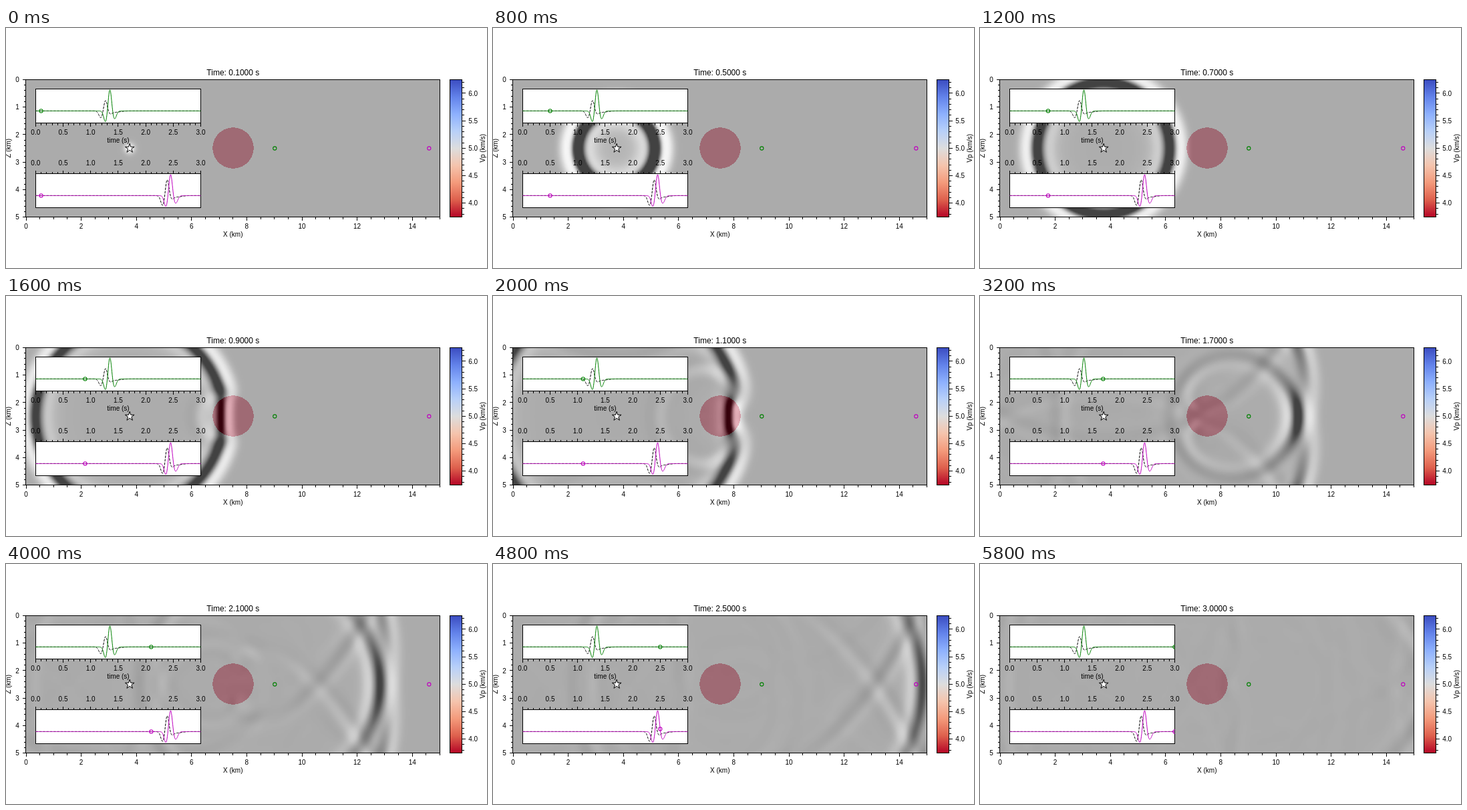
These frames come from a looping animation (720 by 360 pixels, 6 s). An HTML page with a canvas:

```html
<!DOCTYPE html>
<html lang="en">
<head>
<meta charset="utf-8">
<title>Wave propagation</title>
<style>
  html, body { margin: 0; width: 720px; height: 360px; overflow: hidden; background: #fff; }
  canvas, svg { position: absolute; left: 0; top: 0; display: block; }
  text { font: 10px "Liberation Sans", Arial, sans-serif; fill: #000; }
  #title { font-size: 12px; }
  .axis { fill: none; stroke: #000; stroke-width: 1; shape-rendering: crispEdges; }
  .trace { fill: none; stroke-width: 1; }
  .dash { stroke: #000; stroke-dasharray: 3.7 1.6; }
  .dot { fill: none; stroke-width: 1.1; }
</style>
</head>
<body>
<canvas id="field" width="720" height="360"></canvas>
<svg id="plot" width="720" height="360" viewBox="0 0 720 360">
  <defs>
    <linearGradient id="speed" x1="0" y1="0" x2="0" y2="1"></linearGradient>
    <clipPath id="insets"><path d="M44 91h248v52h-248zM44 218h248v52h-248z"/></clipPath>
  </defs>
</svg>
<script>
const FRAMES = 30, FRAME_MS = 200;
const BOX = { x: 30, y: 77.3, w: 619.5, h: 206 };
const KM = BOX.w / 15;
const GREEN = '#008000', MAGENTA = '#bf00bf';

// ---- acoustic wave solver: staggered grid, absorbing margins ----
const DX = 0.05, DT = 0.005, PAD = 18, NX = 301, NZ = 101;
const W = NX + 2 * PAD, H = NZ + 2 * PAD;
const SPEED = 5, SLOW = 3.75, FREQ = 5, GAIN = 736;
const grid = () => new Float32Array(W * H);
const p = grid(), px = grid(), pz = grid(), vx = grid(), vz = grid(), c2 = grid();

for (let j = 0; j < H; j++) {
  for (let i = 0; i < W; i++) {
    const r = Math.hypot((i - PAD) * DX - 7.5, (j - PAD) * DX - 2.5);
    c2[j * W + i] = (r <= 0.75 ? SLOW : SPEED) ** 2;
  }
}

function damping(n, shift) {
  return Float32Array.from({ length: n }, (_, i) => {
    const k = i + shift;
    const depth = Math.max(0, PAD - k, k - (n - 1 - PAD)) / PAD;
    return 32 * depth * depth * DT / 2;
  });
}
const sx = damping(W, 0), sxHalf = damping(W, 0.5);
const sz = damping(H, 0), szHalf = damping(H, 0.5);

const diff = (f, k, s) =>
  (1.125 * (f[k] - f[k - s]) - (f[k + s] - f[k - 2 * s]) / 24) * (DT / DX);
const decay = (v, s, d) => (v * (1 - s) - d) / (1 + s);

let steps = 0;
function step() {
  for (let j = 2; j < H - 2; j++) {
    for (let i = 2; i < W - 2; i++) {
      const k = j * W + i;
      vx[k] = decay(vx[k], sxHalf[i], diff(p, k + 1, 1));
      vz[k] = decay(vz[k], szHalf[j], diff(p, k + W, W));
    }
  }
  for (let j = 2; j < H - 2; j++) {
    for (let i = 2; i < W - 2; i++) {
      const k = j * W + i;
      px[k] = decay(px[k], sx[i], c2[k] * diff(vx, k, 1));
      pz[k] = decay(pz[k], sz[j], c2[k] * diff(vz, k, W));
    }
  }
  const tau = (steps + 0.5) * DT - 1 / FREQ;
  const push = GAIN * tau * Math.exp(-((Math.PI * FREQ * tau) ** 2)) * DT / (DX * DX);
  const src = (50 + PAD) * W + 75 + PAD;
  px[src] += push / 2;
  pz[src] += push / 2;
  for (let k = 0; k < p.length; k++) p[k] = px[k] + pz[k];
  steps++;
}

const GREYS = [255, 240, 217, 189, 150, 115, 82, 37, 0];
function grey(v) {
  const t = Math.min(0.9999, Math.max(0, 0.5 + v / 2)) * 8;
  const i = Math.floor(t);
  return GREYS[i] + (GREYS[i + 1] - GREYS[i]) * (t - i);
}

const snaps = [];
function snapshot(n) {
  while (snaps.length <= n) {
    for (let s = 0; s < 20; s++) step();
    const img = new ImageData(NX, NZ);
    for (let j = 0; j < NZ; j++) {
      for (let i = 0; i < NX; i++) {
        const o = 4 * (j * NX + i);
        const g = grey(p[(j + PAD) * W + i + PAD]);
        img.data[o] = img.data[o + 1] = img.data[o + 2] = g;
        img.data[o + 3] = 255;
      }
    }
    snaps.push(img);
  }
  return snaps[n];
}

// ---- field: speed map below, translucent pressure above ----
const ctx = document.getElementById('field').getContext('2d');
const wave = document.createElement('canvas');
wave.width = NX;
wave.height = NZ;
const waveCtx = wave.getContext('2d');

function drawField(n) {
  waveCtx.putImageData(snapshot(n), 0, 0);
  ctx.save();
  ctx.beginPath();
  ctx.rect(30, 77, 620, 207);
  ctx.clip();
  ctx.fillStyle = '#ddd';
  ctx.fillRect(30, 77, 620, 207);
  ctx.fillStyle = 'rgb(180,4,38)';
  const cx = 340, cy = 180, r = 30.7;
  for (let y = -31; y < 31; y++) {
    const half = Math.round(Math.sqrt(Math.max(0, r * r - (y + 0.5) ** 2)));
    if (half) ctx.fillRect(cx - half, cy + y, 2 * half, 1);
  }
  ctx.globalAlpha = 0.7;
  const cell = DX * KM;
  ctx.drawImage(wave, BOX.x - cell / 2, BOX.y - cell / 2, NX * cell, NZ * cell);
  ctx.restore();
}

// ---- axes, labels and traces ----
const svg = document.getElementById('plot');
function add(tag, attrs, parent = svg) {
  const el = document.createElementNS('http://www.w3.org/2000/svg', tag);
  for (const key in attrs) el.setAttribute(key, attrs[key]);
  parent.appendChild(el);
  return el;
}
function label(str, x, y, anchor = 'middle', extra = {}) {
  const el = add('text', { x, y, 'text-anchor': anchor, ...extra });
  el.textContent = str;
  return el;
}
const vertical = (str, x, y) =>
  label(str, 0, 0, 'middle', { transform: `translate(${x} ${y}) rotate(-90)` });
const snap = v => Math.floor(v) + 0.5;
const frame = (x, y, w, h, fill = 'none') =>
  add('rect', { x, y, width: w, height: h, class: 'axis', style: `fill:${fill}` });

// side: b(ottom), t(op), l(eft), r(ight); every `major`-th tick is long and labelled
function ticks(side, edge, pos, from, to, minor, major, digits) {
  let d = '';
  const out = side === 'b' || side === 'r' ? 1 : -1;
  const flat = side === 'b' || side === 't';
  for (let i = Math.round(from / minor); i <= Math.round(to / minor + 1e-6); i++) {
    const v = i * minor;
    if (v < from - 1e-6 || v > to + 1e-6) continue;
    const big = i % major === 0, at = pos(v), len = out * (big ? 5 : 3);
    d += flat ? `M${snap(at)} ${edge}v${len}` : `M${edge} ${snap(at)}h${len}`;
    if (!big) continue;
    const str = v.toFixed(digits);
    if (side === 'b') label(str, at, edge + 17);
    if (side === 't') label(str, at, edge - 12.3);
    if (side === 'l') label(str, edge - 9.7, at + 3.6, 'end');
    if (side === 'r') label(str, edge + 9.7, at + 3.6, 'start');
  }
  add('path', { d, class: 'axis' });
}

frame(29.5, 77.5, 620, 206);
ticks('b', 283.5, v => BOX.x + v * KM, 0, 15, 0.5, 4, 0);
ticks('l', 29.5, v => BOX.y + v * KM, 0, 5, 0.2, 5, 0);
label('X (km)', 339.8, 313.3);
vertical('Z (km)', 7.3, 180.3);
const title = label('', 339.8, 71, 'middle', { id: 'title' });

const COOLWARM = ['59,76,192', '98,130,234', '141,176,254', '184,208,249', '221,221,221',
  '245,196,173', '244,154,123', '222,96,77', '180,4,38'];
COOLWARM.forEach((c, i) =>
  add('stop', { offset: i / 8, 'stop-color': `rgb(${c})` }, document.getElementById('speed')));
frame(664.5, 77.5, 18, 206, 'url(#speed)');
ticks('r', 682.5, v => BOX.y + (6.25 - v) * 82.4, 3.75, 6.25, 0.1, 5, 1);
vertical('Vp (km/s)', 716.5, 180.3);

const timeX = t => 44.3 + t * 82.4;
// lobes: [centre x, height in px downwards, width]
const lobeSum = (base, lobes) => x =>
  lobes.reduce((y, [c, a, s]) => y + a * Math.exp(-(((x - c) / s) ** 2) / 2), base);
function curve(fn, attrs) {
  let d = '';
  for (let x = 44.5; x <= 291.5; x += 0.5) d += `${d ? 'L' : 'M'}${x} ${fn(x).toFixed(2)}`;
  add('path', { d, ...attrs });
}
const ring = (color, x, y, parent) =>
  add('circle', { cx: x, cy: y, r: 2.6, class: 'dot', stroke: color }, parent);

function inset(top, base, side, color, plain, bent) {
  frame(44.5, top, 247, 51, '#fff');
  ticks(side, side === 'b' ? top + 51 : top, timeX, 0, 3, 0.1, 5, 1);
  const y = lobeSum(base, bent);
  curve(lobeSum(base, plain), { class: 'trace dash' });
  curve(y, { class: 'trace', stroke: color });
  return y;
}
const traces = [
  [GREEN, inset(91.5, 124.4, 'b', GREEN,
    [[142, 10.5, 2.9], [149, -17, 2.6], [155.5, 3.6, 3], [163, 2, 8]],
    [[149, 17, 2.6], [155.5, -33, 2.5], [162.3, 12.5, 2.8]])],
  [MAGENTA, inset(218.5, 251.4, 't', MAGENTA,
    [[234.7, 15.5, 2.9], [241.2, -25.5, 2.6], [248, 4.5, 3], [256, 2, 7]],
    [[239.5, 17, 2.7], [246.4, -33, 2.6], [253.7, 12, 3.2]])],
];
label('time (s)', 168, 172.3);

const group = add('g', { 'clip-path': 'url(#insets)' });
const riders = traces.map(([color, y]) => ({ y, dot: ring(color, 0, 0, group) }));

const star = Array.from({ length: 10 }, (_, i) => {
  const a = i * Math.PI / 5, r = i % 2 ? 2.75 : 7.2;
  return `${185.2 + r * Math.sin(a)},${180.5 - r * Math.cos(a)}`;
});
add('polygon', { points: star.join(' '), fill: '#fff', stroke: '#000' });
ring(GREEN, 402.3, 180.5);
ring(MAGENTA, 633.3, 180.5);

// ---- playback ----
let shown = -1;
function play() {
  const n = Math.floor(performance.now() / FRAME_MS) % FRAMES;
  if (n !== shown) {
    shown = n;
    const t = (n + 1) / 10, x = timeX(t);
    drawField(n);
    title.textContent = `Time: ${t.toFixed(4)} s`;
    for (const { y, dot } of riders) {
      dot.setAttribute('cx', x);
      dot.setAttribute('cy', y(x));
    }
  }
  requestAnimationFrame(play);
}
play();
</script>
</body>
</html>
```
